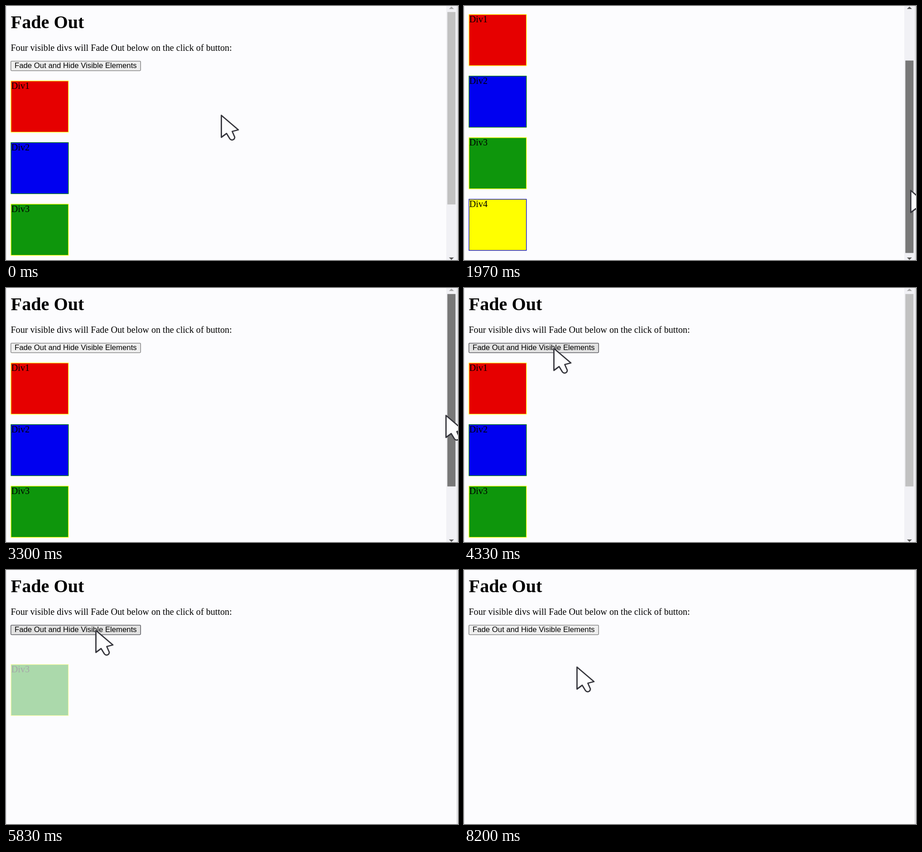
These frames come from a looping animation (998 px wide and 561 px high, 8.23 s). An HTML page:

```html
<!DOCTYPE html>
<html lang="en">
<head>
<meta charset="utf-8">
<title>Fade Out</title>
<style>
@property --scroll { syntax: "<length>"; inherits: true; initial-value: 0px; }

html, body { margin: 0; width: 100%; height: 100%; overflow: hidden; background: #fcfcfe; }

svg {
  display: block; width: 998px; height: 561px;
  --loop: 8.23s;
  --swing: cubic-bezier(.364, 0, .636, 1);
  animation: scroll var(--loop) linear infinite;
}
text { font: 20.15px "Liberation Serif", "Times New Roman", serif; fill: #000; }
.title { font-size: 40.2px; font-weight: bold; }
.label { font: 16.75px "Liberation Sans", Arial, sans-serif; }

.page { transform: translateY(calc(-1 * var(--scroll))); }
.box rect { stroke-width: 1.3px; }
.button { fill: #efefef; stroke: #767676; stroke-width: 1.3px; animation: button var(--loop) step-end infinite; }

.div1 { animation: fade1 var(--loop) infinite; }
.div2 { animation: fade2 var(--loop) infinite, lift2 var(--loop) step-end infinite; }
.div3 { animation: fade3 var(--loop) infinite, lift3 var(--loop) step-end infinite; }
.div4 { animation: fade4 var(--loop) infinite; }

.bar { animation: bar var(--loop) step-end infinite; }
.thumb {
  transform: translateY(calc(.73 * var(--scroll)));
  animation: thumb var(--loop) step-end infinite;
}
.up { animation: up var(--loop) step-end infinite; }
.cursor { animation: cursor var(--loop) linear infinite; }

@keyframes scroll {
  0%, 10.09% { --scroll: 0px; animation-timing-function: cubic-bezier(.4, 0, .8, .75); }
  14.95% { --scroll: 55px; animation-timing-function: cubic-bezier(.25, .3, .6, 1); }
  20.9%, 23% { --scroll: 148px; animation-timing-function: cubic-bezier(.4, 0, .75, .65); }
  30.74% { --scroll: 87.5px; animation-timing-function: cubic-bezier(.25, .3, .6, 1); }
  38.5%, 100% { --scroll: 0px; }
}
@keyframes cursor {
  0%, .36% { transform: translate(474px, 240px); animation-timing-function: ease-in-out; }
  7.65%, 10.09% { transform: translate(985px, 300px); animation-timing-function: cubic-bezier(.35, 0, .8, .75); }
  14.95% { transform: translate(987px, 349px); animation-timing-function: cubic-bezier(.25, .3, .6, 1); }
  20.4%, 22.5% { transform: translate(985px, 408px); animation-timing-function: cubic-bezier(.4, 0, .75, .65); }
  30.74% { transform: translate(983px, 357px); animation-timing-function: cubic-bezier(.25, .3, .6, 1); }
  40.1%, 40.3% { transform: translate(970px, 280px); animation-timing-function: ease-in-out; }
  50.18%, 93.4% { transform: translate(197px, 132px); animation-timing-function: ease-in-out; }
  99.5%, 100% { transform: translate(248px, 213px); }
}
@keyframes button {
  0% { fill: #efefef; stroke: #767676; }
  49.4% { fill: #e2e2e2; stroke: #45454c; }
  54.31% { fill: #f5f5f5; stroke: #8d8d8d; }
  60.4% { fill: #e2e2e2; stroke: #45454c; }
  95.1%, 100% { fill: #efefef; stroke: #767676; }
}
/* One click starts four fades: 600, 800, 2150 and 400 ms */
@keyframes fade1 {
  0%, 60.81% { opacity: 1; animation-timing-function: var(--swing); }
  68.1%, 100% { opacity: 0; }
}
@keyframes fade2 {
  0%, 60.81% { opacity: 1; animation-timing-function: var(--swing); }
  70.53%, 100% { opacity: 0; }
}
@keyframes fade3 {
  0%, 60.81% { opacity: 1; animation-timing-function: var(--swing); }
  86.94%, 100% { opacity: 0; }
}
@keyframes fade4 {
  0%, 60.81% { opacity: 1; animation-timing-function: var(--swing); }
  65.67%, 100% { opacity: 0; }
}
/* Boxes below close up once a box above is hidden */
@keyframes lift2 {
  0% { transform: none; }
  68.1%, 100% { transform: translateY(-114.5px); }
}
@keyframes lift3 {
  0% { transform: none; }
  68.1% { transform: translateY(-114.5px); }
  70.53%, 100% { transform: translateY(-229px); }
}
@keyframes bar {
  0% { opacity: 1; }
  68.1%, 100% { opacity: 0; }
}
@keyframes thumb {
  0% { fill: #c1c1c1; height: 425px; }
  6.6% { fill: #a8a8a8; height: 425px; }
  10.09% { fill: #787878; height: 425px; }
  40.4% { fill: #c1c1c1; height: 425px; }
  65.67%, 100% { fill: #c1c1c1; height: 507px; }
}
@keyframes up {
  0% { fill: #a3a3a3; }
  10.4% { fill: #505050; }
  38.5%, 100% { fill: #a3a3a3; }
}
</style>
</head>
<body>
<svg viewBox="0 0 998 561">
  <rect width="1" height="561" fill="#dcdce4"/>
  <rect x="995.5" width="1.5" height="561" fill="#c9c9cd"/>

  <g class="page">
    <text class="title" x="10.6" y="49">Fade Out</text>
    <text x="10.4" y="99">Four visible divs will Fade Out below on the click of button:</text>
    <rect class="button" x="10.8" y="121.8" width="286.4" height="21" rx="1.5"/>
    <text class="label" x="19" y="137.4">Fade Out and Hide Visible Elements</text>

    <g class="box div1">
      <rect x="11" y="165.6" width="126.8" height="113" fill="#e60000" stroke="#ffff00"/>
      <text x="11.8" y="183">Div1</text>
    </g>
    <g class="box div2">
      <rect x="11" y="301.6" width="126.8" height="113" fill="#0000f0" stroke="#008000"/>
      <text x="11.8" y="319">Div2</text>
    </g>
    <g class="box div3">
      <rect x="11" y="437.6" width="126.8" height="113" fill="#0e960c" stroke="#ffff00"/>
      <text x="11.8" y="455">Div3</text>
    </g>
    <g class="box div4">
      <rect x="11" y="573.6" width="126.8" height="113" fill="#ffff00" stroke="#0000d0"/>
      <text x="11.8" y="591">Div4</text>
    </g>
  </g>

  <g class="bar">
    <rect x="972" width="22" height="561" fill="#f1f1f5"/>
    <rect class="thumb" x="974.5" y="13.3" width="18" height="425"/>
    <path class="up" d="M978 6.5h11l-5.5-5z"/>
    <path d="M978 555.5h11l-5.5 5z" fill="#505050"/>
  </g>

  <path class="cursor" d="M1.5 1.5V50L13 41.5L20 53q3 4 7 2.5t4-6L25.5 37L39 33.5z"
    fill="#fdfdfe" stroke="#35353c" stroke-width="2.8" stroke-linejoin="round"/>
</svg>
</body>
</html>
```
